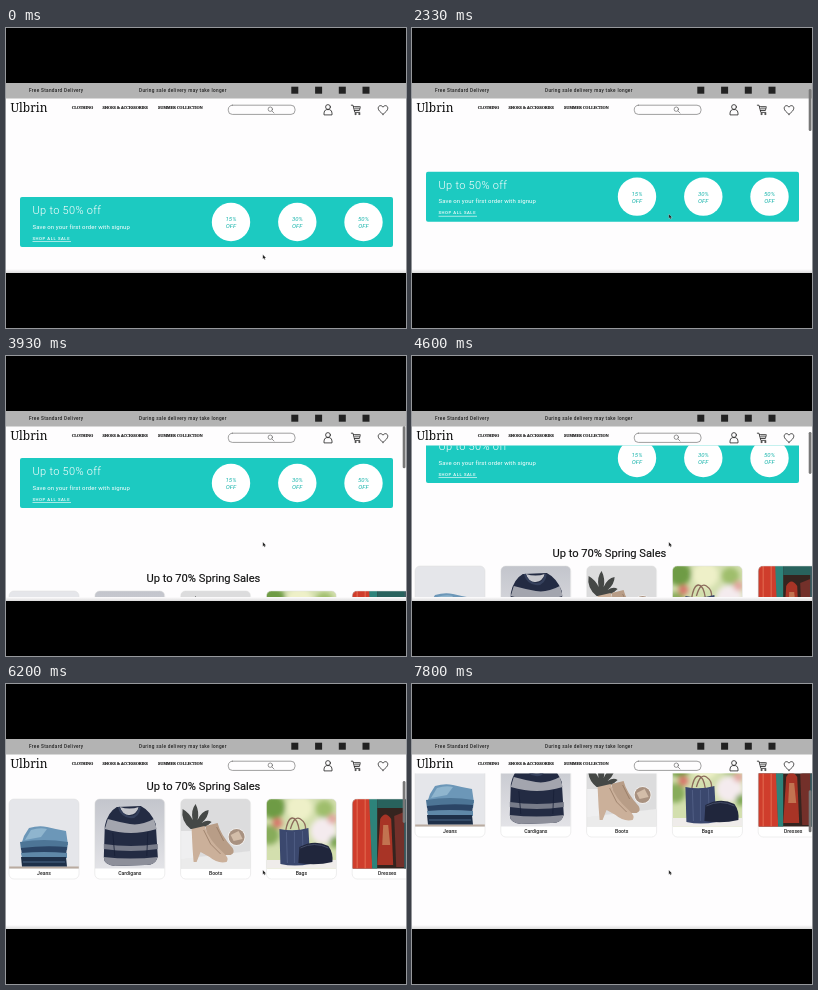
Recreate the animation shown at these times as an HTML page. Size 400 px wide and 300 px high, loop 8 s.

```html
<!DOCTYPE html>
<html lang="en">
<head>
<meta charset="utf-8">
<title>Shop</title>
<style>
html, body { margin: 0; width: 100%; height: 100%; overflow: hidden; background: #000; }
svg { display: block; width: 400px; height: 300px; font-family: Roboto, sans-serif; }
.bar { font-size: 4.7px; font-weight: 500; letter-spacing: .33px; fill: #222; }
.nav { font: bold 4.1px "Noto Serif", serif; letter-spacing: -.16px; fill: #111; stroke: #111; stroke-width: .1; }
.logo { font: 12px "Noto Serif", serif; fill: #111; }
.line { fill: none; stroke: #222; stroke-width: .8; stroke-linejoin: round; stroke-linecap: round; }
.off { font-size: 6px; font-style: italic; text-anchor: middle; fill: #1bb5ad; }
.label { font-size: 5.1px; font-weight: 500; text-anchor: middle; fill: #222; }
</style>
</head>
<body>
<svg viewBox="0 0 400 300">
  <defs>
    <clipPath id="view"><rect y="89.5" width="400" height="155.5"/></clipPath>
    <clipPath id="photo"><path d="M0 69.5V5a5 5 0 0 1 5-5H65a5 5 0 0 1 5 5V69.5Z"/></clipPath>
    <filter id="soft"><feGaussianBlur stdDeviation="2.5"/></filter>
    <linearGradient id="foot" x2="0" y2="1">
      <stop stop-color="#fefdfe"/><stop offset="1" stop-color="#dcdcdc"/>
    </linearGradient>
    <linearGradient id="wall" x2="0" y2="1">
      <stop stop-color="#c3c5cc"/><stop offset="1" stop-color="#e3e3e7"/>
    </linearGradient>
  </defs>
  <rect y="55" width="400" height="190" fill="#fefdfe"/>

  <g clip-path="url(#view)">
    <g id="page">
      <rect x="14" width="373" height="50" rx="2" fill="#1ccac1"/>
      <g fill="#fff">
        <text x="26.5" y="17" font-size="11" font-weight="300" letter-spacing=".3">Up to 50% off</text>
        <text x="26.5" y="31.5" font-size="6" letter-spacing=".1">Save on your first order with signup</text>
        <text x="26.5" y="42.6" font-size="4.2" font-weight="500" letter-spacing=".55">SHOP ALL SALE</text>
        <rect x="26.5" y="44.2" width="38.5" height=".6"/>
      </g>
      <g id="deals"></g>
      <text x="197.4" y="124" font-size="11.15" text-anchor="middle" fill="#111" stroke="#111" stroke-width=".15">Up to 70% Spring Sales</text>
      <g id="cards"></g>
    </g>
  </g>
  <rect y="241" width="400" height="4" fill="url(#foot)"/>

  <rect y="55" width="400" height="15.5" fill="#b3b3b3"/>
  <text class="bar" x="23" y="64.2">Free Standard Delivery</text>
  <text class="bar" x="133" y="64.2">During sale delivery may take longer</text>
  <g fill="#222">
    <rect x="285.3" y="58.7" width="7" height="7"/>
    <rect x="309.1" y="58.7" width="7" height="7"/>
    <rect x="332.8" y="58.7" width="7" height="7"/>
    <rect x="356.5" y="58.7" width="7" height="7"/>
  </g>
  <text class="logo" x="4.5" y="83.7">Ulbrin</text>
  <text class="nav" x="65.7" y="81.4">CLOTHING</text>
  <text class="nav" x="96.5" y="81.4">SHOES &amp; ACCESSORIES</text>
  <text class="nav" x="152" y="81.4">SUMMER COLLECTION</text>
  <g class="line">
    <rect x="222.3" y="77.2" width="66.7" height="9.2" rx="4" stroke="#777" stroke-width=".7"/>
    <path d="M266 83l2 2" stroke="#555" stroke-width=".6"/><circle cx="264.3" cy="81.2" r="2.2" stroke="#555" stroke-width=".6"/>
    <circle cx="322" cy="79" r="2.4"/>
    <path d="M318 86.5v-1.5q0-2.8 2.6-3.4h2.8q2.6.6 2.6 3.4v1.5z"/>
    <path d="M345.3 77.2h1.7l1.8 7.2h5M347.4 78.7h6.9l-.9 3.8h-5"/>
    <path d="M348 80.6h5.8M350 78.7v3.8M352 78.7v3.8" stroke-width=".4"/>
    <circle cx="349.4" cy="86" r=".6"/><circle cx="353.2" cy="86" r=".6"/>
    <path d="M377 86.3C374.5 84.2 372.2 82.4 372.2 80.2C372.2 77.4 375.6 76.7 377 79.2C378.4 76.7 381.8 77.4 381.8 80.2C381.8 82.4 379.5 84.2 377 86.3Z"/>
  </g>

  <rect id="thumb" x="396.7" width="2.8" height="42" rx="1.4" fill="#777"/>
  <path id="cursor" d="M0 0V4.6L1.1 3.7L1.8 5.2L2.6 4.8L1.9 3.4H3.3Z" fill="#111" stroke="#fff" stroke-width=".3"/>
</svg>

<script>
const $ = id => document.getElementById(id);
const shape = (fill, d) => `<path fill="${fill}" d="${d}"/>`;
const stroke = (color, width, d) =>
  `<path fill="none" stroke="${color}" stroke-width="${width}" d="${d}"/>`;
const dot = (fill, x, y, r) => `<circle fill="${fill}" cx="${x}" cy="${y}" r="${r}"/>`;
const soft = art => `<g filter="url(#soft)">${art}</g>`;

// Simplified product pictures, each 70 x 69.5
const photos = {
  Jeans: shape('#e5e6ea', 'M0 0H70V70H0Z') + shape('#b9aba0', 'M0 67.5H70V70H0Z') +
    shape('#6c97b8', 'M20 29Q30 26 38 28T57 32L59 46H12L15 37Z') +
    shape('#8fb5ce', 'M22 31Q31 28 38 30L32 38L16 41Z') +
    shape('#4d7596', 'M11 43Q35 39 59 43L58 51H12Z') +
    shape('#2b4566', 'M12 49Q36 46 58 48L57 57H13Z') + shape('#5f88a8', 'M12 54Q35 52 58 54V59H13Z') +
    shape('#1e3049', 'M12 58H57L58 67.5H13Z') + stroke('#4a6786', 1, 'M14 63H56'),

  Cardigans: shape('url(#wall)', 'M0 0H70V70H0Z') +
    shape('#232b43', 'M22 8L46 7Q56 12 61 25L63 58Q60 67 50 66L20 67Q9 66 9 58L10 27Q13 13 22 8Z') +
    shape('#a3a5ae', 'M13 20Q24 23 35 25T59 20L62 30Q48 34 36 34T10 30Z') +
    shape('#777b89', 'M9 45Q36 49 63 45V50Q36 54 9 50Z') +
    shape('#8d8f9a', 'M9 58Q36 61 63 58Q60 67 50 66L20 67Q9 66 9 58Z') +
    shape('#c6c7cd', 'M25 8Q35 11 44 8Q42 15 35 16T25 8Z') +
    stroke('#35405c', 2.2, 'M24 8Q27 17 35 18T45 8') + stroke('#171f36', .8, 'M18 34L20 57M53 33L52 57'),

  Boots: shape('#dcdcdd', 'M0 0H70V70H0Z') + shape('#efeff0', 'M0 32H22L18 60H0Z') +
    shape('#ebebeb', 'M0 60L70 52V70H0Z') +
    shape('#454846', 'M10 30Q0 22 2 10Q9 14 12 21Q10 11 15 5Q19 13 17 21Q21 12 28 11Q28 18 21 24Q27 20 31 23Q25 29 17 30Z') +
    shape('#b89d87', 'M25 27L37 24Q40 36 52 49Q55 54 50 56H36L28 48Z') +
    shape('#cbb09a', 'M11 30L24 27Q28 41 43 54Q49 59 46 63Q37 65 29 58L20 53L16 63H13L12 50Z') +
    stroke('#8f735d', .7, 'M23 31L30 45L40 55M36 28L43 42') +
    dot('#f5f3f1', 56, 38, 8.8) + dot('#a89180', 56, 38, 8) + shape('#d3bda9', 'M50 36L58 32L62 40L53 42Z'),

  Bags: shape('#d3dfae', 'M0 0H70V70H0Z') + soft(
    dot('#6e9b45', 7, 8, 12) + dot('#eef0c8', 33, 9, 13) + dot('#9fbe6c', 58, 10, 9) +
    dot('#f4ebee', 57, 32, 13) + dot('#87ac5a', 3, 36, 10) + dot('#d8746a', 11, 24, 5) +
    dot('#e3a6a0', 66, 20, 5) + dot('#7da652', 69, 43, 6)) +
    shape('#efecea', 'M0 61H70V70H0Z') +
    stroke('#8c6c5c', 1.3, 'M19 34Q21 19 26 19T33 32M24 30Q28 16 34 20T39 31') +
    shape('#3b486e', 'M13 30Q28 33 42 29L44 65Q28 68 14 65Z') +
    stroke('#55638a', .8, 'M20 33L21 64M28 33V64M36 32L37 64') +
    shape('#20263c', 'M33 48Q48 40 62 47Q67 54 66 63Q50 67 32 64Z') + stroke('#4d5672', .8, 'M34 49Q48 42 62 49'),

  Dresses: shape('#35241f', 'M0 0H70V70H0Z') + shape('#cf3d2c', 'M0 0H18L20 70H0Z') +
    shape('#2d837a', 'M17 0H25V70H20Z') + shape('#28625d', 'M25 0H54V9H25Z') +
    stroke('#e0654c', 1.2, 'M5 0V70M13 0V70') +
    shape('#a83426', 'M28 20Q33 11 39 20L41 66H25Z') + shape('#c27350', 'M31 26H36L38 46H30Z') +
    shape('#73302a', 'M42 17L52 13V68H44Z') + shape('#3c5d63', 'M52 0H70V70H52Z')
};

$('deals').innerHTML = [[225, 15], [291.3, 30], [357.5, 50]].map(([x, pct]) =>
  dot('#fff', x, 25, 19.2) +
  `<text class="off" x="${x}" y="24.2">${pct}%</text><text class="off" x="${x}" y="31.4">OFF</text>`).join('');

$('cards').innerHTML = Object.entries(photos).map(([name, art], i) =>
  `<g transform="translate(${3 + i * 85.8} 133)">
    <rect width="70" height="80" rx="5" fill="#fff"/>
    <g clip-path="url(#photo)">${art}</g>
    <rect width="70" height="80" rx="5" fill="none" stroke="#ddd" stroke-width=".5"/>
    <text class="label" x="35" y="76">${name}</text>
  </g>`).join('');

const LOOP = 8000, STEP = 200 / 3, LAST = 117;
const START = 169;
// [ms, scrolled px]
const scrollKeys = [[870, 0], [1400, 10], [1800, 16], [2600, 32], [3400, 53], [4000, 71],
  [4600, 92], [5400, 130], [6050, 186], [6200, 187], [7000, 208], [7800, 229]];

function scrollAt(t) {
  if (t <= scrollKeys[0][0]) return 0;
  const i = scrollKeys.findIndex(k => k[0] >= t);
  if (i < 0) return scrollKeys.at(-1)[1];
  const [t0, a] = scrollKeys[i - 1], [t1, b] = scrollKeys[i];
  return a + (b - a) * (t - t0) / (t1 - t0);
}

function draw(now) {
  const t = Math.min(LAST, Math.floor((now % LOOP) / STEP + .01)) * STEP;
  const scroll = scrollAt(t);
  const p = Math.min(1, t / 870), ease = p * p * (3 - 2 * p);
  $('page').setAttribute('transform', `translate(0 ${START - scroll})`);
  $('cursor').setAttribute('transform', `translate(256.8 ${226.5 - 40.5 * ease})`);
  $('thumb').setAttribute('visibility', scroll > 0 ? 'visible' : 'hidden');
  $('thumb').setAttribute('y', 55.5 + scroll * .222);
}

function loop() {
  draw(performance.now());
  requestAnimationFrame(loop);
}
loop();
</script>
</body>
</html>
```
